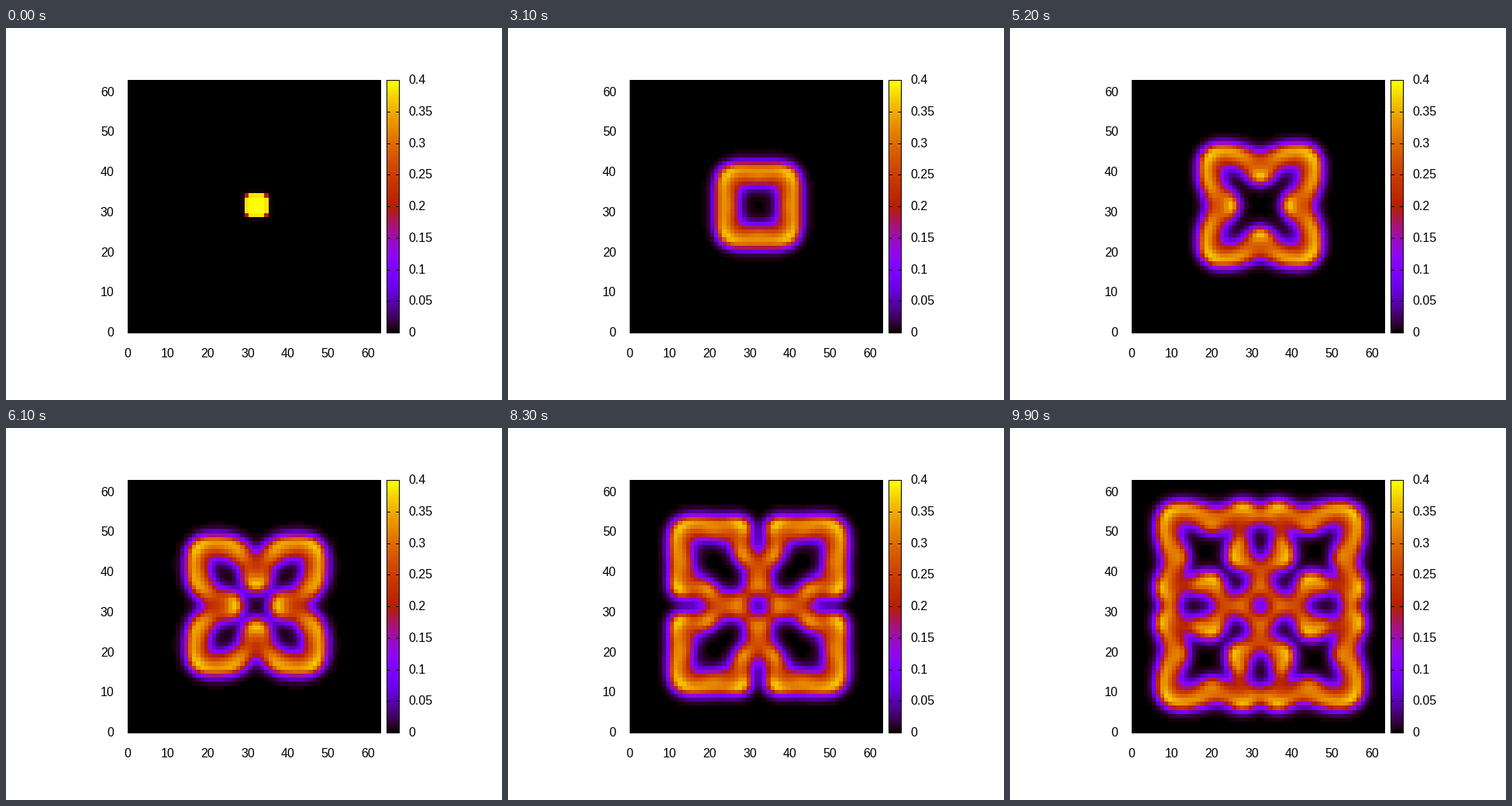
A matplotlib script that plays this animation: 640x480 px, repeating every 10 s.

```python
import numpy as np
import matplotlib.pyplot as plt
from matplotlib.animation import FuncAnimation
from matplotlib.patches import Rectangle

plt.rcParams["font.family"] = "Liberation Sans"
plt.rcParams["font.size"] = 11.52

# Gray-Scott reaction-diffusion on a periodic grid
SIZE, FRAMES, STEPS = 64, 100, 100
FEED, KILL, DT = 0.04, 0.06075, 0.2
DIFF = np.array([0.05, 0.1]).reshape(2, 1, 1)
VMAX, LEVELS = 0.4, 128

# Plot area in pixels, first and last row or column included
X0, X1, Y0, Y1 = 157, 483, 67, 393
SPAN = X1 - X0
BAR0, BAR1 = 491, 507

# Map each pixel of the plot area to its grid cell
CELL = 5.181
pixel = np.arange(SPAN + 1) + 0.5
cols = np.clip((pixel + X0 - 157.31) // CELL, 0, SIZE - 2).astype(int)
rows = np.clip((394.69 - Y0 - pixel) // CELL, 0, SIZE - 2).astype(int)


def step(s):
    lap = (np.roll(s, 1, 1) + np.roll(s, -1, 1)
           + np.roll(s, 1, 2) + np.roll(s, -1, 2) - 4 * s)
    u, v = s
    react = u * u * v
    rate = DIFF * lap
    rate[0] += react - (FEED + KILL) * u
    rate[1] += FEED * (1 - v) - react
    return s + DT * rate


def simulate():
    s = np.zeros((2, SIZE, SIZE))
    off = np.abs(np.arange(SIZE) - SIZE // 2)
    dist = np.maximum.outer(off, off)
    s[0][dist < 3] = 0.7
    s[1][dist < 6] = 0.9
    s = step(s)
    fields = []
    for _ in range(FRAMES):
        fields.append(s[0])
        for _ in range(STEPS):
            s = step(s)
    return fields


def palette(g):
    g = np.clip(np.floor(g * LEVELS) / (LEVELS - 1), 0, 1)
    blue = np.clip(np.sin(2 * np.pi * g), 0, 1)
    return np.stack([np.sqrt(g), g ** 3, blue], axis=-1)


def shade(u):
    mean = (u[:-1, :-1] + u[1:, :-1] + u[:-1, 1:] + u[1:, 1:]) / 4
    return palette(mean / VMAX)[np.ix_(rows, cols)]


def show(rgb, left, right):
    return ax.imshow(rgb, aspect="auto", interpolation="nearest",
                     extent=(left, right + 1, Y1 + 1, Y0))


fields = simulate()

fig = plt.figure(figsize=(6.4, 4.8), dpi=100, facecolor="white")
ax = fig.add_axes([0, 0, 1, 1])
ax.axis("off")

image = show(shade(fields[0]), X0, X1)

# Colour bar
show(palette(np.linspace(1, 0, SPAN + 1))[:, None], BAR0, BAR1)
ax.add_patch(Rectangle((BAR0, Y0), BAR1 - BAR0, SPAN, fill=False,
                       ec="black", lw=0.72, zorder=3))
for i in range(9):
    y = Y1 - SPAN * i / 8
    for x in (BAR0, BAR1 - 4):
        ax.plot([x, x + 4], [y, y], color="black", lw=0.72, zorder=3)
    ax.text(519.6, y + 5.2, f"{i * 0.05:.2g}", va="baseline")

for n in range(0, SIZE, 10):
    d = SPAN * n / (SIZE - 1)
    ax.text(X0 + d, 425, str(n), ha="center", va="baseline")
    ax.text(139.7, Y1 + 5.2 - d, str(n), ha="right", va="baseline")

ax.set_xlim(0, 640)
ax.set_ylim(480, 0)


def draw(i):
    image.set_data(shade(fields[i]))
    return [image]


anim = FuncAnimation(fig, draw, frames=FRAMES, interval=100,
                     repeat=True, repeat_delay=0, blit=False)
plt.show()
```
